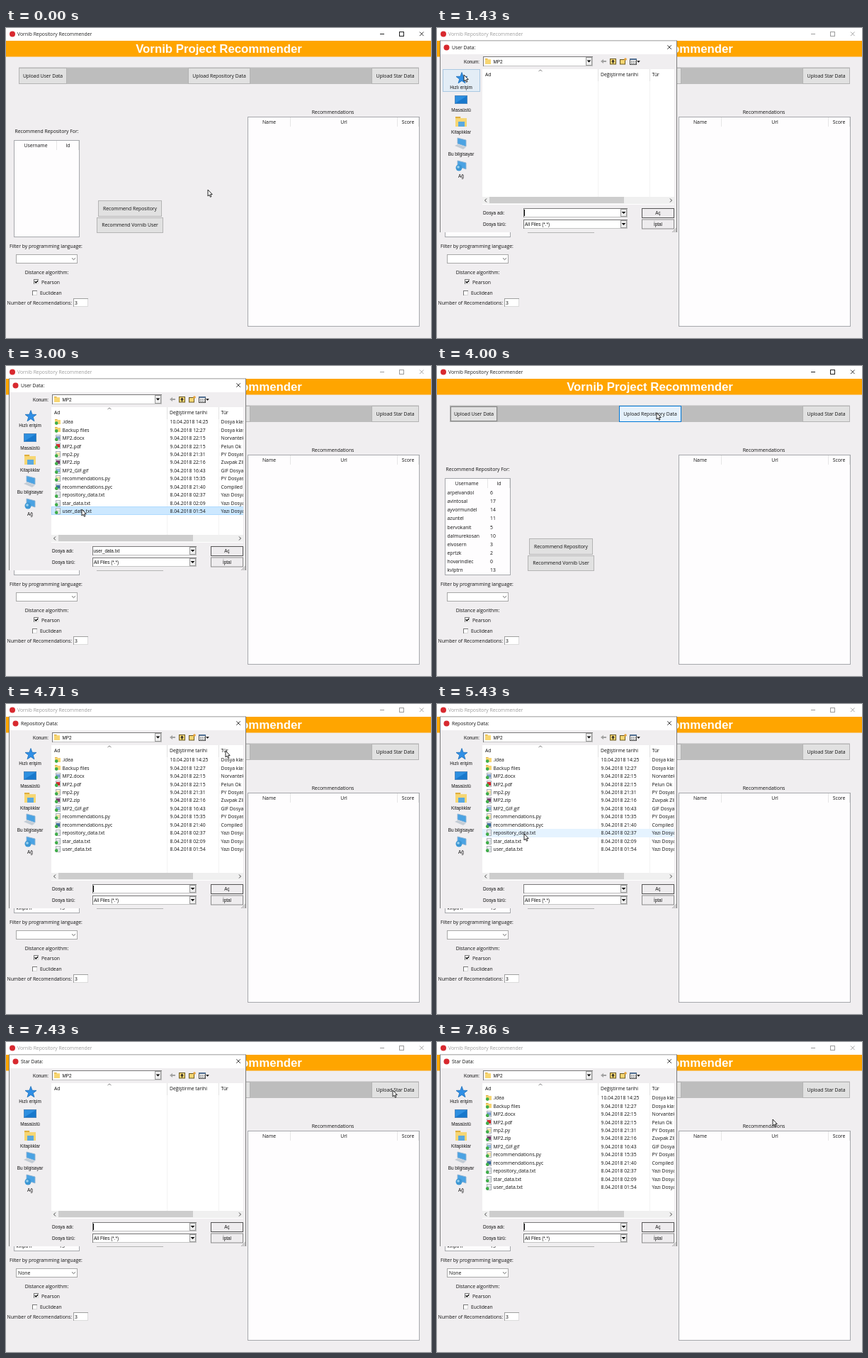
Recreate the animation shown at these times as an HTML page with a canvas. Size 600x437 px, loop 8000 ms.

```html
<!DOCTYPE html>
<html lang="tr">
<head>
<meta charset="utf-8">
<title>Repository Recommender</title>
<style>
html, body { margin: 0; width: 100%; height: 100%; overflow: hidden; background: #f0eef0; }
canvas { display: block; }
</style>
</head>
<body>
<canvas id="stage" width="600" height="437"></canvas>
<script>
const ctx = document.getElementById('stage').getContext('2d');
const LOOP = 8000, STEP = 1000 / 7;
const UI = '6.82px "Open Sans", "Noto Sans", sans-serif';
const CLASSIC = '6.4px "Liberation Sans", Arial, sans-serif';
const FACE = '#f0eef0', GREY = '#b4b4b4', BLUE = '#0078d7';

const users = [['arpelvandol', 6], ['avintosal', 17], ['ayvormundel', 14], ['azuntel', 11],
  ['bervokanit', 5], ['dalmurekosan', 10], ['elvosern', 3], ['eprtzk', 2], ['hovarindlec', 0], ['kvlptrn', 13]];

// name, date, type, icon colour
const files = [
  ['.idea', '10.04.2018 14:25', 'Dosya klasörü', 'folder'],
  ['Backup files', '9.04.2018 12:27', 'Dosya klasörü', 'folder'],
  ['MP2.docx', '9.04.2018 22:15', 'Norvantek', '#7fa3d0'],
  ['MP2.pdf', '9.04.2018 22:15', 'Pelun Ok', '#d22b2b'],
  ['mp2.py', '9.04.2018 21:31', 'PY Dosyası', '#efe2a8'],
  ['MP2.zip', '9.04.2018 22:16', 'Zuvpak ZIP', '#7a3f6d'],
  ['MP2_GIF.gif', '9.04.2018 16:43', 'GIF Dosyası', '#8fb8dc'],
  ['recommendations.py', '9.04.2018 15:35', 'PY Dosyası', '#efe2a8'],
  ['recommendations.pyc', '9.04.2018 21:40', 'Compiled', '#3f6f9f'],
  ['repository_data.txt', '8.04.2018 02:37', 'Yazı Dosyası', '#dfe3e7'],
  ['star_data.txt', '8.04.2018 02:09', 'Yazı Dosyası', '#dfe3e7'],
  ['user_data.txt', '8.04.2018 01:54', 'Yazı Dosyası', '#dfe3e7']];

// times below count steps of 1/7 s
const dialogs = [
  { title: 'User Data:', open: 9, list: 11, pick: 20, file: 11, close: 23 },
  { title: 'Repository Data:', open: 31, list: 32, pick: 41, file: 9, close: 43 },
  { title: 'Star Data:', open: 52, list: 53, pick: 99, file: 10, close: 99 }];
const pointerPath = [[0, 285, 228], [2, 285, 228], [8, 38, 66], [10, 38, 66], [18, 107, 202], [23, 107, 202],
  [28, 310, 66], [32, 310, 66], [38, 123, 183], [43, 123, 183], [45, 113, 183], [46, 113, 183],
  [50, 546, 68], [53, 546, 68], [55, 474, 109]];

function rect(x, y, w, h, fill) { ctx.fillStyle = fill; ctx.fillRect(x, y, w, h); }
function box(x, y, w, h, fill, edge) { rect(x, y, w, h, edge); rect(x + 1, y + 1, w - 2, h - 2, fill); }
function text(str, x, y, align = 'left', font = UI, color = '#111') {
  ctx.font = font; ctx.textAlign = align; ctx.fillStyle = color;
  ctx.fillText(str, x, y);
}
function poly(points, fill, edge, closed = true) {
  ctx.beginPath();
  points.forEach(([x, y]) => ctx.lineTo(x, y));
  if (closed) ctx.closePath();
  if (fill) { ctx.fillStyle = fill; ctx.fill(); }
  if (edge) { ctx.strokeStyle = edge; ctx.lineWidth = 0.9; ctx.stroke(); }
}
function disc(x, y, r, fill) { ctx.beginPath(); ctx.arc(x, y, r, 0, 7); ctx.fillStyle = fill; ctx.fill(); }
function cross(x, y, s, color) {
  poly([[x, y], [x + s, y + s]], null, color, false);
  poly([[x + s, y], [x, y + s]], null, color, false);
}
function triangle(x, y, s) { poly([[x - s, y - s / 2], [x + s, y - s / 2], [x, y + s / 2]], '#000'); }
function inside([px, py], x, y, w, h) { return px >= x && px < x + w && py >= y && py < y + h; }

function pointerAt(k) {
  const i = pointerPath.findIndex(p => p[0] > k);
  if (i < 0) return pointerPath.at(-1).slice(1);
  const [t0, x0, y0] = pointerPath[i - 1], [t1, x1, y1] = pointerPath[i];
  const u = (k - t0) / (t1 - t0), e = u * u * (3 - 2 * u);
  return [x0 + (x1 - x0) * e, y0 + (y1 - y0) * e];
}

function button(label, x, y, w, h, hover, focus) {
  box(x, y, w, h, hover ? '#e5f1fb' : '#e1e1e1', hover ? BLUE : GREY);
  if (focus && !hover) {
    ctx.strokeStyle = '#858585'; ctx.lineWidth = 1;
    ctx.strokeRect(x + 1.5, y + 1.5, w - 3, h - 3);
  }
  text(label, x + w / 2, y + h / 2 + 2.4, 'center');
}

function table(x, y, w, h, columns, dividers) {
  box(x, y, w, h, '#fefdfe', '#a6a8ac');
  columns.forEach(([label, cx]) => text(label, cx, y + 10.4, 'center'));
  dividers.forEach(dx => rect(dx, y + 1, 1, 13, '#e6e6e6'));
}

function checkbox(x, y, checked) {
  box(x, y, 7, 7, '#fff', '#d8d8d8');
  rect(x, y, 7, 1, '#777'); rect(x, y, 1, 7, '#777');
  if (checked) poly([[x + 1.6, y + 2.6], [x + 3.2, y + 4], [x + 6.2, y + 1.2], [x + 6.2, y + 3], [x + 3.2, y + 6],
    [x + 1.6, y + 4.5]], '#000');
}

function mainWindow(k, pointer, active) {
  rect(0, 0, 600, 437, FACE);
  rect(0, 0, 600, 18, '#fff');
  const ink = active ? '#222' : '#9c9c9c';
  disc(9, 8.5, 4, '#d8292f');
  text('Vornib Repository Recommender', 16, 11, 'left', UI, ink);
  rect(528, 8, 6, 1, ink);
  box(555, 5, 7, 7, '#fff', ink);
  cross(584, 5.5, 5.6, ink);
  rect(0, 18, 600, 22.5, '#ffa500');
  text('Vornib Project Recommender', 300.5, 35, 'center', 'bold 16.8px "Liberation Sans", Arial, sans-serif', '#fff');

  const hover = (...area) => active && inside(pointer, ...area);
  rect(18, 55.5, 565, 23.5, '#bdbdbd');
  button('Upload User Data', 18, 56, 68, 23, hover(18, 56, 68, 23), active && k >= 23 && k < 31);
  button('Upload Repository Data', 257, 56, 88, 23, hover(257, 56, 88, 23), active && k >= 43);
  button('Upload Star Data', 516, 56, 67, 23, hover(516, 56, 67, 23));

  text('Recommendations', 461.5, 121, 'center');
  table(341, 125, 243, 296, [['Name', 371.5], ['Url', 477], ['Score', 567.5]], [401, 552, 582]);

  text('Recommend Repository For:', 57.5, 148, 'center');
  table(11, 158, 93, 137, [['Username', 42], ['Id', 87.5]], [71, 102]);
  if (k >= 23) users.forEach(([name, id], i) => {
    text(name, 14.5, 181.3 + i * 12.05);
    text(id, 75, 181.3 + i * 12.05);
  });

  button('Recommend Repository', 130, 243, 90, 23);
  button('Recommend Vornib User', 128, 267, 94, 22);

  text('Filter by programming language:', 5, 309.5);
  box(14, 319, 87, 13, '#fff', '#a8a8a8');
  poly([[93, 324.3], [95.5, 326.7], [98, 324.3]], null, '#555', false);
  if (k >= 48) text('None', 17, 328);
  text('Distance algorithm:', 57.5, 347, 'center');
  checkbox(39, 354, true);
  text('Pearson', 50, 360.5);
  checkbox(37, 370, false);
  text('Euclidean', 48, 376);
  text('Number of Recomendations:', 1.5, 389.5);
  box(95, 381, 21, 12, '#fff', '#dcdcdc');
  rect(95, 381, 21, 1, '#a0a0a0'); rect(95, 381, 1, 12, '#a0a0a0');
  text('3', 97, 389.5);
}

function folder(x, y, w, h) {
  rect(x, y, w * 0.45, h * 0.3, '#dfae3c');
  rect(x, y + h * 0.15, w, h * 0.85, '#f7d673');
}

function fileIcon(kind, x, y) {
  if (kind === 'folder') folder(x, y + 1, 8, 7);
  else {
    box(x + 1, y, 7, 9, '#fff', '#a8adb3');
    rect(x + 2, y + 2, 5, 5, kind);
  }
  disc(x + 2.2, y + 6.6, 2.3, '#3fae49');
}

function monitor(x, y, w, h) {
  box(x, y, w, h, '#2d8fe0', '#4c86be');
  poly([[x + 1, y + h - 1], [x + w - 1, y + 1], [x + w - 1, y + h - 1]], '#1878cc');
}

function tiltedScreen(x, y) {
  poly([[x, y], [x + 12, y + 3], [x + 12, y + 12], [x, y + 8]], '#4ba3e3', '#8fb4d3');
}

function sidebar(pointer) {
  if (inside(pointer, 8, 58, 52, 32)) box(8, 58, 53, 32, '#e3edf6', '#a9c8e2');
  const star = Array.from({ length: 10 }, (_, i) => {
    const a = i * Math.PI / 5 - Math.PI / 2, r = i % 2 ? 3.4 : 8.4;
    return [35 + r * Math.cos(a), 71 + r * Math.sin(a)];
  });
  poly(star, '#2f8fe6', '#2474be');
  monitor(25, 95, 18, 12);
  folder(26, 125, 16, 14);
  rect(30, 132, 9, 7, '#5aa9df');
  tiltedScreen(29, 155);
  poly([[25, 166], [29, 164], [41, 168], [37, 171]], '#c3ccd5');
  tiltedScreen(29, 187);
  disc(31, 197, 4.5, '#3c97d4');
  disc(30, 196, 1.8, '#9dd2ef');
  ['Hızlı erişim', 'Masaüstü', 'Kitaplıklar', 'Bu bilgisayar', 'Ağ'].forEach((label, i) =>
    text(label, 34, 86.3 + i * 31.2, 'center', CLASSIC));
}

function fileList(listed, picked, pointer) {
  rect(64, 58, 271, 191, '#fff');
  ctx.save();
  ctx.beginPath(); ctx.rect(64, 58, 271, 191); ctx.clip();
  rect(227, 58, 1, 180, '#f3f3f3'); rect(300, 58, 1, 180, '#f3f3f3');
  rect(227, 58, 1, 17, '#e2e2e2'); rect(300, 58, 1, 17, '#e2e2e2');
  text('Ad', 68, 68);
  text('Değiştirme tarihi', 231, 68);
  text('Tür', 303.5, 68);
  poly([[143.5, 61], [146, 59], [148.5, 61]], null, '#777', false);
  if (listed) files.forEach(([name, date, type, kind], i) => {
    const y = 73 + i * 11.45, top = Math.floor(y);
    if (i === picked) box(64, top, 272, 12, '#cce8ff', '#b0dbff');
    else if (inside(pointer, 64, y, 271, 11.45)) rect(64, top, 271, 12, '#e5f3ff');
    fileIcon(kind, 69, Math.round(y + 1));
    text(name, 79.5, y + 8.2);
    text(date, 231.5, y + 8.2);
    text(type, 303.5, y + 8.2);
  });
  ctx.restore();
  rect(64, 238, 271, 10, '#f0f0f0');
  rect(74, 238, 190, 9, '#cdcdcd');
  poly([[70, 240.5], [67.5, 243], [70, 245.5]], null, '#333', false);
  poly([[329, 240.5], [331.5, 243], [329, 245.5]], null, '#333', false);
}

function dropField(x, y, w, h) {
  box(x, y, w, h, '#fff', '#c4c4c4');
  rect(x, y, w, 1, '#7a7a7a'); rect(x, y, 1, h, '#7a7a7a');
  box(x + w - 10, y + 1, 9, h - 2, '#eee', '#999');
  triangle(x + w - 5.5, y + h / 2, 2.8);
}

function pushButton(label, y, edge) {
  box(289, y, 46, 14, '#eeecee', edge);
  text(label, 312, y + 9.2, 'center', CLASSIC);
}

function toolbar() {
  poly([[231, 47], [235, 44], [235, 46], [239, 46], [239, 48], [235, 48], [235, 50]], '#a2a2a2');
  folder(244, 43, 9, 8);
  ctx.strokeStyle = '#6b5a22'; ctx.lineWidth = 1;
  ctx.strokeRect(244.5, 43.5, 8, 7.5);
  poly([[248.5, 44.5], [251, 47.5], [249.2, 47.5], [249.2, 50], [247.8, 50], [247.8, 47.5], [246, 47.5]], '#222');
  folder(258, 44, 8, 7);
  ctx.strokeRect(258.5, 44.5, 7, 6.5);
  disc(266, 44, 1.8, '#e6a23a');
  box(272, 43, 10, 9, '#fff', '#444');
  rect(272, 43, 10, 2, '#4f6d91');
  for (let i = 0; i < 6; i++) rect(274 + (i % 3) * 2.5, 46.5 + (i > 2) * 2.5, 1.5, 1.2, '#444');
  triangle(284.5, 47.5, 2.3);
}

function fileDialog(dialog, k, pointer) {
  const picked = k >= dialog.pick;
  rect(4, 17.5, 335, 270.5, '#7c7c7c');
  rect(5, 18.5, 333, 269.5, FACE);
  rect(5, 18.5, 333, 18.5, '#fff');
  disc(13.5, 27.5, 4, '#d8292f');
  text(dialog.title, 21, 30);
  cross(325.3, 24.3, 5.6, '#222');
  text('Konum:', 38, 50, 'left', CLASSIC);
  dropField(65, 40, 155, 14);
  folder(68, 43, 8, 8);
  text('MP2', 79.5, 50, 'left', CLASSIC);
  toolbar();
  sidebar(pointer);
  fileList(k >= dialog.list, picked ? dialog.file : -1, pointer);

  text('Dosya adı:', 65, 263, 'left', CLASSIC);
  text('Dosya türü:', 65, 278.5, 'left', CLASSIC);
  dropField(122, 254, 147, 13);
  dropField(122, 270, 147, 13);
  if (picked) text(files[dialog.file][0], 123.5, 263, 'left', CLASSIC);
  else if ((k - dialog.open) * STEP % 1060 < 530) rect(123, 256, 1, 9, '#000');
  text('All Files (*.*)', 124, 279, 'left', CLASSIC);
  pushButton('Aç', 254, '#555');
  pushButton('İptal', 269.5, '#8c8c8c');
  for (let i = 2; i < 7; i += 2) poly([[338 - i, 288], [338, 288 - i]], null, '#a0a0a0', false);
}

function arrow([x, y]) {
  const shape = [[0, 0], [0, 9], [2, 7.2], [3.5, 10.3], [4.9, 9.6], [3.5, 6.7], [6.2, 6.5]];
  poly(shape.map(([dx, dy]) => [x + dx, y + dy]), '#fff', '#111');
}

function draw(now) {
  const k = Math.floor(((now % LOOP) + 2) / STEP);
  const pointer = pointerAt(k);
  const dialog = dialogs.find(d => k >= d.open && k < d.close);
  mainWindow(k, pointer, !dialog);
  if (dialog) fileDialog(dialog, k, pointer);
  arrow(pointer);
}

const start = performance.now();
function tick() {
  draw(performance.now() - start);
  requestAnimationFrame(tick);
}
tick();
</script>
</body>
</html>
```
